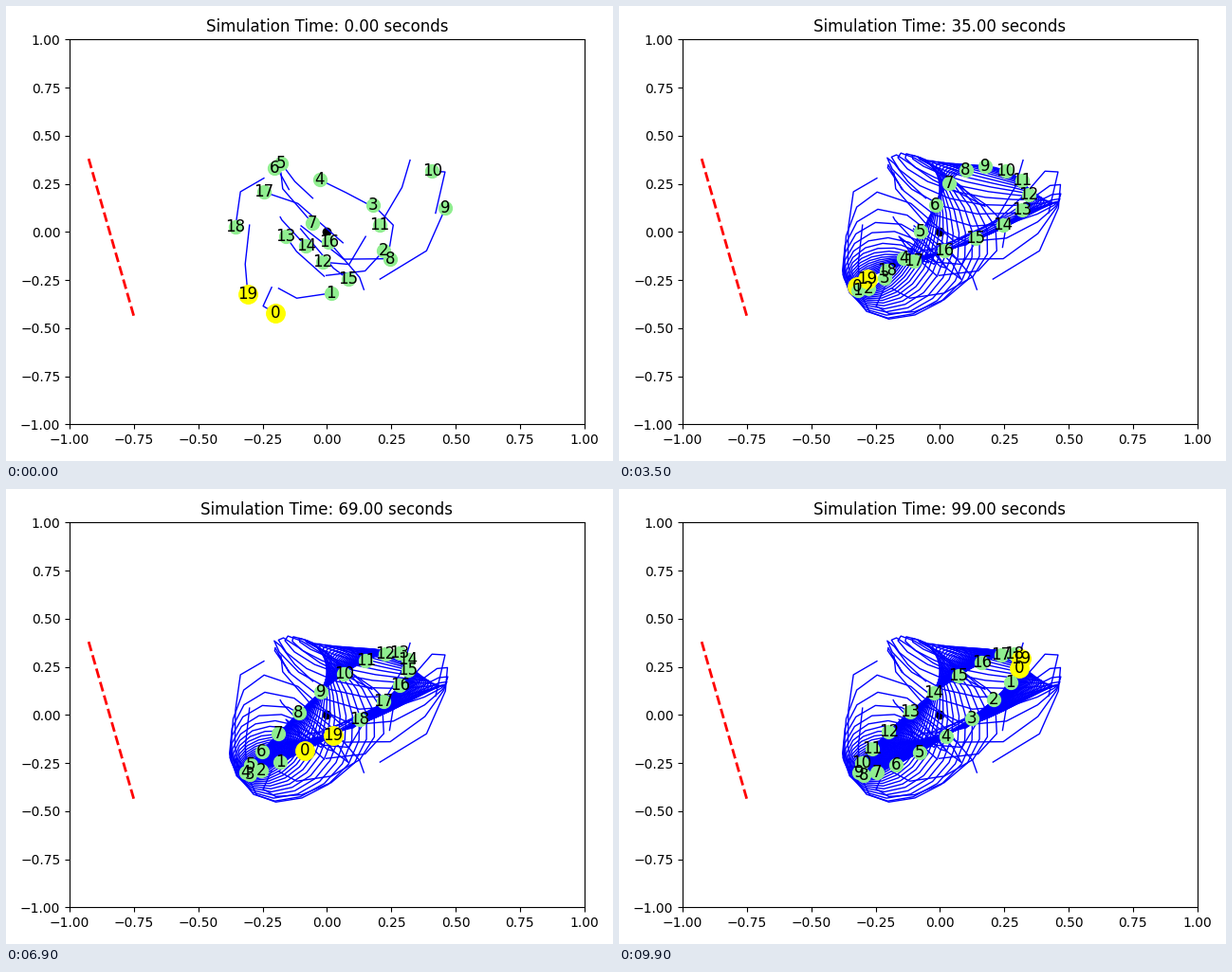
Recreate the animation shown at these times as a matplotlib script. Size 640 by 480 pixels, loop 10000 ms.

```python
import numpy as np
import matplotlib.pyplot as plt
from matplotlib.animation import FuncAnimation

N, FRAMES, LEAD = 20, 100, 2


def wave(k, size, phase):
    """One harmonic around the ring of robots, phase in degrees."""
    return size * np.cos(2 * np.pi * k * np.arange(N) / N - np.radians(phase))


def step(p):
    """Move every robot halfway to the next, then rescale x and y to unit norm."""
    mid = (p + np.roll(p, -1, axis=0)) / 2
    return mid / np.linalg.norm(mid, axis=0)


# The starting polygon is a tangle of a few harmonics
x = (wave(1, 0.136, 175.2) + wave(2, 0.0985, 71.7) + wave(3, 0.214, 182.5)
     + wave(4, 0.033, 67.8) + wave(5, 0.031, 5.7) + wave(6, 0.0665, -24.8))
y = (wave(1, 0.1135, 150.1) + wave(2, 0.0915, -127.4) + wave(3, 0.1534, -91.8)
     + wave(5, 0.158, -124.5) + wave(6, 0.1274, 108.2))

path = [np.column_stack([x, y])]
for _ in range(FRAMES + LEAD - 1):
    path.append(step(path[-1]))
path = np.array(path)

fig, ax = plt.subplots(figsize=(6.4, 4.8), dpi=100)
ax.set_xlim(-1, 1)
ax.set_ylim(-1, 1)
title = ax.set_title("Simulation Time: 0.00 seconds")
fig.tight_layout()
fig.subplots_adjust(top=1 - 35.3 / 480)

ax.plot([-0.926, -0.75], [0.38, -0.44], "r--", lw=2)
ax.plot(0, 0, "ko", ms=6)

trails = [ax.plot([], [], "b-", lw=1)[0] for _ in range(N)]
dots, labels = [], []
for i in range(N):
    leader = i in (0, N - 1)
    dots += ax.plot([], [], "o", color="yellow" if leader else "lightgreen",
                    ms=14 if leader else 10)
    labels.append(ax.text(0, 0, str(i), fontsize=12, ha="center", va="center"))


def update(frame):
    now = frame + LEAD
    for i in range(N):
        px, py = path[now, i]
        trails[i].set_data(path[:now + 1, i, 0], path[:now + 1, i, 1])
        dots[i].set_data([px], [py])
        labels[i].set_position((px, py))
    title.set_text(f"Simulation Time: {frame:.2f} seconds")
    return [*trails, *dots, *labels, title]


anim = FuncAnimation(fig, update, frames=FRAMES, interval=100, repeat=True)
plt.show()
```
